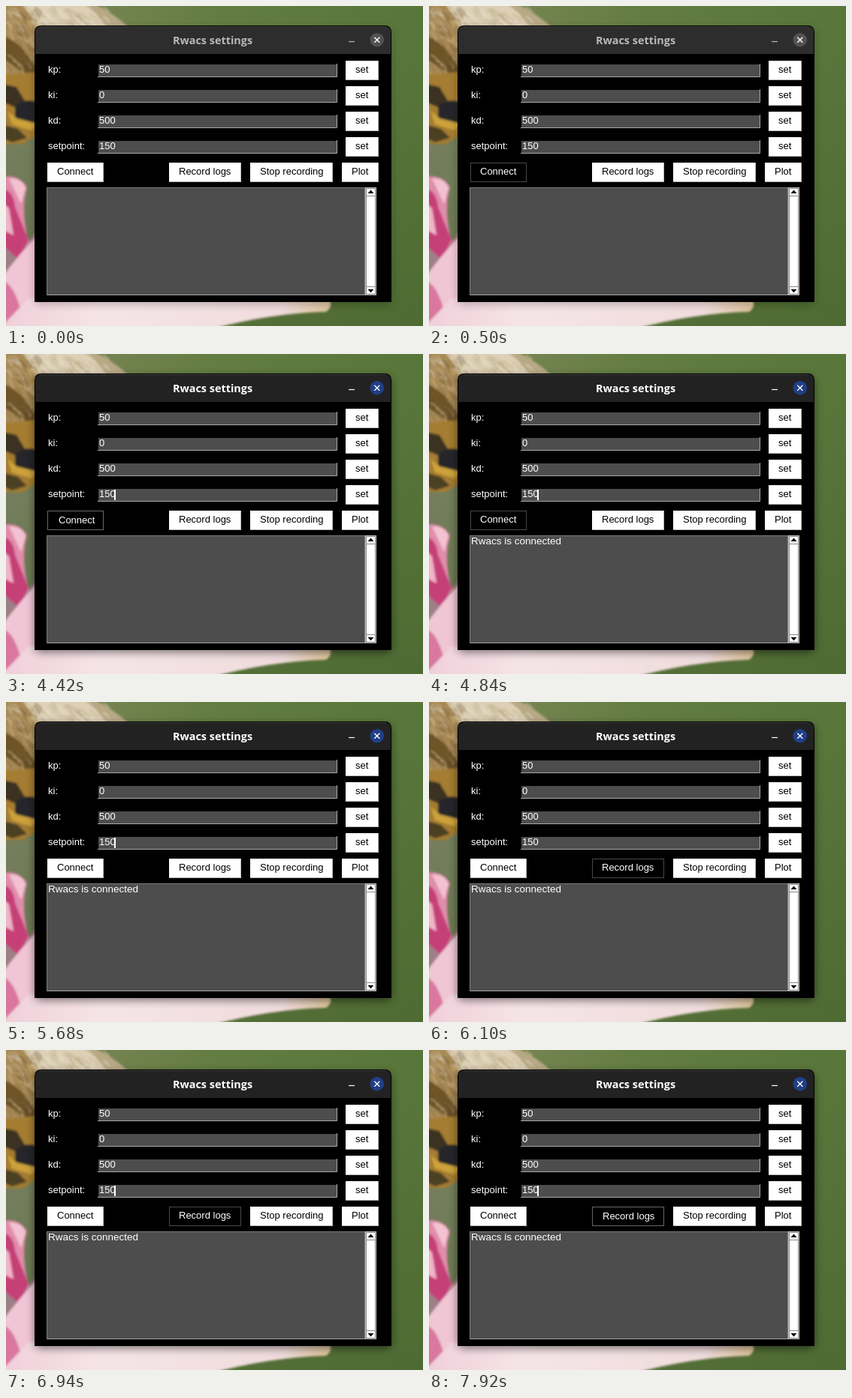
These frames come from a looping animation (555x427 px, 8 s). An HTML page:

```html
<!DOCTYPE html>
<html lang="en">
<head>
<meta charset="utf-8">
<title>Rwacs settings</title>
<style>
  html, body { margin: 0; width: 100%; height: 100%; overflow: hidden; background: #56713a; }
  svg { display: block; width: 555px; height: 427px; }
  text { font: 13px "Liberation Sans", Arial, sans-serif; fill: #fff; white-space: pre; }
  .title { font: bold 14.4px "Open Sans", "Noto Sans", sans-serif; text-anchor: middle; }
  .log { font-size: 13.5px; }
</style>
</head>
<body>
<svg viewBox="0 0 555 427">
  <defs>
    <linearGradient id="leaf">
      <stop offset="0" stop-color="#7f8468"/>
      <stop offset=".25" stop-color="#74834f"/>
      <stop offset=".5" stop-color="#637d42"/>
      <stop offset="1" stop-color="#58763a"/>
    </linearGradient>
    <linearGradient id="dusk" x2="0" y2="1">
      <stop offset=".1" stop-color="#3f5a28" stop-opacity="0"/>
      <stop offset="1" stop-color="#3f5a28" stop-opacity=".4"/>
    </linearGradient>
    <linearGradient id="petal">
      <stop offset="0" stop-color="#f0cfda"/>
      <stop offset=".3" stop-color="#f5e4e7"/>
      <stop offset=".85" stop-color="#f0dcdc"/>
      <stop offset="1" stop-color="#dfc49a"/>
    </linearGradient>
    <filter id="soft"><feGaussianBlur stdDeviation="1.4"/></filter>
    <filter id="shade" x="-10%" y="-10%" width="120%" height="120%"><feGaussianBlur stdDeviation="6"/></filter>
  </defs>

  <rect width="555" height="427" fill="url(#leaf)"/>
  <rect width="555" height="427" fill="url(#dusk)"/>
  <g filter="url(#soft)">
    <path d="M-5-5H112Q142 8 165 30H-5Z" fill="#b9aa87"/>
    <path d="M14-5H100Q122 8 136 30H34Z" fill="#ddd0b6"/>
    <path d="M-5-5H20L45 30V100L-5 96Z" fill="#a98a56"/>
    <path d="M-5 40Q16 44 42 82V100L-5 70Z" fill="#6d5227"/>
    <path d="M-5 92L42 88V172L22 184-5 184Z" fill="#a47d31"/>
    <path d="M-5 104L14 108 26 128 14 136-5 128Z" fill="#3b3322"/>
    <path d="M12 134Q24 122 42 128V156Q24 160 12 148Z" fill="#26282a"/>
    <path d="M2 140L14 150 42 157 34 166 8 158Z" fill="#cda23b"/>
    <path d="M-5 158L16 164 28 176 8 182-5 176Z" fill="#4b3f22"/>
    <g id="fur" fill="none" stroke-width="1.6"></g>

    <path d="M-5 228Q18 224 28 242 20 268 28 306L42 340V427H-5Z" fill="#e08cab"/>
    <path d="M-5 244Q10 246 12 268L30 312 16 342-5 318Z" fill="#c63f78"/>
    <path d="M-5 262L4 270 10 306-5 298Z" fill="#eeb6c8"/>
    <path d="M4 230Q22 230 26 243L20 264Z" fill="#f3c2d1"/>
    <path d="M-5 318L16 338 42 296V348L-5 366Z" fill="#9d7f86"/>
    <path d="M-5 362Q18 330 42 306V427H-5Z" fill="#f0c6d5"/>
    <path d="M-5 366Q10 372 18 400L28 427H-5Z" fill="#d9779f"/>
    <path d="M-5 427L30 390H430Q436 401 426 408 350 410 270 432H-5Z" fill="url(#petal)"/>
  </g>

  <rect id="shadow" x="38" y="30" width="475" height="368" rx="8" filter="url(#shade)"/>
  <path d="M38 395V35Q38 26 47 26H504Q513 26 513 35V395Z"/>
  <path id="bar" d="M39 64V35Q39 27 47 27H504Q512 27 512 35V64Z"/>
  <path d="M46 27.5H505" stroke="#3c3c3c"/>
  <text class="title" id="title" x="275" y="51">Rwacs settings</text>
  <path id="mini" d="M456 47.5H464" stroke-width="1.2"/>
  <circle id="close" cx="493.8" cy="45.2" r="9.3"/>
  <path d="M490.3 41.7L497.3 48.7M497.3 41.7L490.3 48.7" stroke="#fff" stroke-width="1.4"/>

  <g id="form"></g>
  <rect id="caret" x="144" y="181" width="2" height="14" fill="#fff"/>

  <rect x="54.5" y="242.5" width="423" height="143" fill="#4d4d4d" stroke="#7c7c7c"/>
  <path d="M55 385.5H478" stroke="#a8a8a8"/>
  <text class="log" id="log" x="56" y="254">Rwacs is connected</text>
  <rect x="478" y="242" width="15" height="144" fill="#c4c4c4"/>
  <rect x="479.5" y="243.5" width="12" height="141" fill="#fff" stroke="#8a8a8a"/>
  <path d="M480 253.5H491M480 374.5H491" stroke="#8a8a8a"/>
  <path d="M481.5 250L485.5 245.5 489.5 250ZM481.5 378L485.5 382.5 489.5 378Z"/>
</svg>
<script>
const $ = id => document.getElementById(id);
const form = $("form");

function add(tag, attrs, parent = form) {
  const el = document.createElementNS("http://www.w3.org/2000/svg", tag);
  for (const key in attrs) el.setAttribute(key, attrs[key]);
  return parent.appendChild(el);
}

function label(str, x, y) {
  const el = add("text", { x, y });
  el.textContent = str;
  return el;
}

// Returns a setter: 0 = idle, 1 = hovered, 2 = pressed
function button(str, x, y, w, textX, shift = 1) {
  const box = add("rect", { x: x + .5, y: y + .5, width: w - 1, height: 25 });
  const edge = add("path", { d: `M${x} ${y + 25.5}h${w - .5}V${y}`, fill: "none" });
  const text = label(str, textX, y + 16);
  const set = mode => {
    box.style.fill = mode ? "#000" : "#fff";
    box.style.stroke = ["#fff", "#484848", "#686868"][mode];
    edge.style.stroke = ["#b8b8b8", "#484848", "#686868"][mode];
    text.style.fill = mode ? "#fff" : "#000";
    text.setAttribute("transform", mode == 2 ? `translate(${shift} 1)` : "");
  };
  set(0);
  return set;
}

// Seeded hairs over the insect's head
let seed = 7;
const rand = () => (seed = seed * 16807 % 2147483647) / 2147483647;
for (let i = 0; i < 130; i++) {
  const top = i % 2;
  const x = rand() * (top ? 130 : 40), y = rand() * (top ? 26 : 85);
  const tones = top ? ["#efe6d2", "#b5a37c"] : ["#dcc394", "#7b6034", "#54421f"];
  add("path", {
    d: `M${x} ${y}q${4 + rand() * 4} 2 ${6 + rand() * 6} ${6 + rand() * 6}`,
    stroke: tones[Math.floor(rand() * tones.length)], opacity: .6
  }, $("fur"));
}

[["kp:", 50], ["ki:", 0], ["kd:", 500], ["setpoint:", 150]].forEach(([name, value], i) => {
  const y = 77 + i * 34;
  label(name, 56, y + 12);
  add("rect", { x: 123, y: y + 1, width: 317, height: 16, fill: "#4d4d4d" });
  add("path", { d: `M122 ${y + 17.5}H440.5V${y}`, fill: "none", stroke: "#a8a8a8" });
  label(value, 124, y + 12);
  button("set", 452, y - 4, 44, 465);
});
const connect = button("Connect", 55, 209, 75, 68, 2);
const record = button("Record logs", 217, 209, 96, 230);
button("Stop recording", 325, 209, 110, 338);
button("Plot", 447, 209, 49, 460);

const show = (id, on) => $(id).style.visibility = on ? "visible" : "hidden";

function draw(t) {
  const active = t >= 4420;
  $("bar").style.fill = active ? "#222" : "#2d2d2d";
  $("title").style.fill = active ? "#fff" : "#b8b8b8";
  $("mini").style.stroke = active ? "#fff" : "#b8b8b8";
  $("close").style.fill = active ? "#203f88" : "#515151";
  $("shadow").style.opacity = active ? .5 : .25;

  connect(t < 500 || t >= 5680 ? 0 : t >= 4420 && t < 4720 ? 2 : 1);
  record(t < 6100 ? 0 : t < 7920 ? 1 : 2);
  show("caret", active && (t < 6100 || t >= 6940));
  show("log", t >= 4840);
}

const start = performance.now();
function tick() {
  draw((performance.now() - start) % 8000);
  requestAnimationFrame(tick);
}
tick();
</script>
</body>
</html>
```
